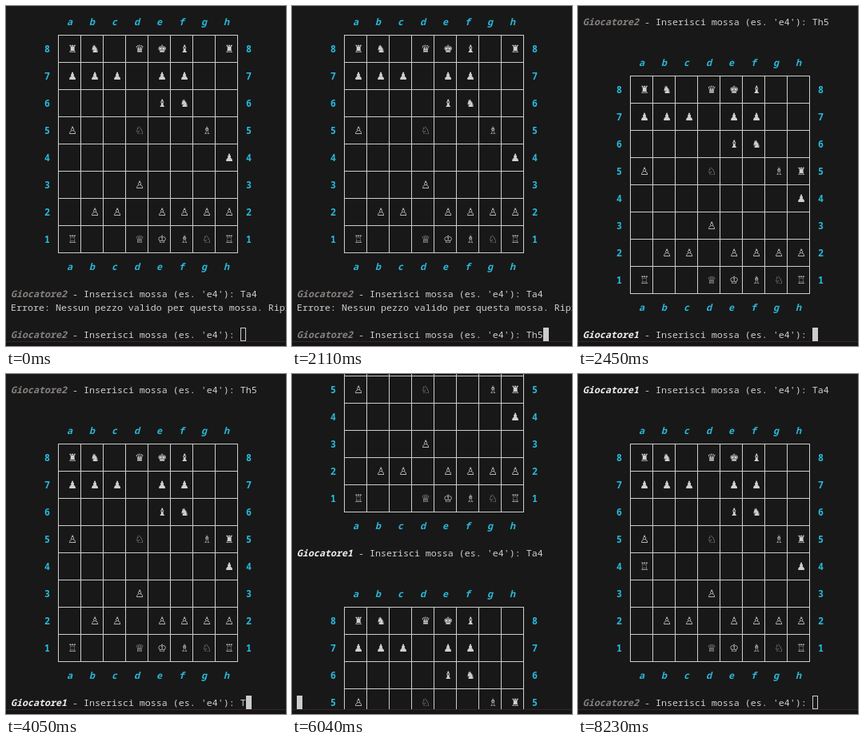
Write an HTML page that moves like this. It is 350 px wide and 425 px high and loops after 8300 ms.

```html
<!DOCTYPE html>
<html lang="it">
<head>
<meta charset="utf-8">
<title>Scacchi nel terminale</title>
<style>
  html, body { margin: 0; width: 100%; height: 100%; overflow: hidden; background: #181818; }
  svg { display: block; width: 350px; height: 425px; }
  text { font: 11.667px "Noto Sans Mono", monospace; fill: #d0d0d0; white-space: pre; }
  .label { font-weight: 700; fill: #29b8db; }
  .file, .player { font-style: italic; }
  .player { font-weight: 700; }
  .p1 { fill: #f0f0f0; }
  .p2 { fill: #87827f; }
  .piece { font: 13px "DejaVu Sans", sans-serif; text-anchor: middle; }
  .grid { stroke: #ccc; fill: none; }
</style>
</head>
<body>
<svg viewBox="0 0 350 425">
  <clipPath id="view"><rect width="350" height="419"/></clipPath>
  <g clip-path="url(#view)">
    <g id="screen"></g>
    <rect id="cursor" stroke="#ccc"/>
  </g>
  <rect y="419" width="350" height="1" fill="#2b2b2b"/>
  <rect y="420" width="350" height="5" fill="#181416"/>
</svg>
<script>
const COL = 7, ROW = 17, LEFT = 6, TOP = 11, LAST_ROW = 23, PROMPT_COL = 41, LOOP = 8300;
const GLYPHS = Object.fromEntries([..."KQRBNPkqrbnp"].map((key, i) => [key, String.fromCharCode(0x2654 + i)]));
const screen = document.getElementById("screen");
const cursor = document.getElementById("cursor");

const colX = col => LEFT + col * COL;
const rowY = row => TOP + row * ROW;

function add(parent, tag, attrs, content = "") {
  const node = document.createElementNS("http://www.w3.org/2000/svg", tag);
  for (const name in attrs) node.setAttribute(name, attrs[name]);
  node.textContent = content;
  return parent.appendChild(node);
}

function write(col, row, content, cls = "") {
  return add(screen, "text", { x: colX(col), y: rowY(row) + 13, class: cls }, content);
}

function drawBoard(row, position) {
  const left = colX(8) + 3.5, top = rowY(row + 1) + 8.5;
  let path = "";
  for (let i = 0; i <= 8; i++) {
    path += `M${left - 0.5} ${top + i * 34}h225M${left + i * 28} ${top - 0.5}v273`;
  }
  add(screen, "path", { d: path, class: "grid" });

  [..."abcdefgh"].forEach((file, i) => {
    for (const r of [row, row + 18]) write(10 + i * 4, r, file, "label file");
  });

  position.split("/").forEach((rank, i) => {
    const r = row + 2 + i * 2;
    for (const col of [6, 42]) write(col, r, 8 - i, "label");
    const squares = rank.replace(/\d/g, n => ".".repeat(n));
    [...squares].forEach((key, file) => {
      if (key === ".") return;
      add(screen, "text", { x: 83 + file * 28, y: rowY(r) + 13, class: "piece" }, GLYPHS[key] + "\uFE0E");
    });
  });
}

function drawPrompt(row, player, move = "") {
  const line = write(0, row, "");
  add(line, "tspan", { class: `player p${player}` }, `Giocatore${player}`);
  add(line, "tspan", {}, " - Inserisci mossa (es. 'e4'): ");
  return add(line, "tspan", {}, move);
}

const MIDDLE = "ppp1pp2/4bn2/";
const PAWNS = "3P4/1PP1PPPP/";
drawBoard(0, `rn1qkb1r/${MIDDLE}P2N2B1/7p/${PAWNS}R2QKBNR`);
drawPrompt(20, 2, "Ta4");
write(0, 21, "Errore: Nessun pezzo valido per questa mossa. Riprova.");
const firstMove = drawPrompt(23, 2);
drawBoard(26, `rn1qkb2/${MIDDLE}P2N2Br/7p/${PAWNS}R2QKBNR`);
const secondMove = drawPrompt(46, 1);
drawBoard(49, `rn1qkb2/${MIDDLE}P2N2Br/R6p/${PAWNS}3QKBNR`);
drawPrompt(69, 2);

// [start ms, scrolled rows, first move, second move, cursor column, focused]
const STEPS = [
  [0, 0, "", "", 41, false],
  [330, 0, "", "", 41, true],
  [1390, 0, "T", "", 42, true],
  [1980, 0, "Th", "", 43, true],
  [2110, 0, "Th5", "", 44, true],
  [2380, 11, "Th5", "", 0, true],
  [2450, 23, "Th5", "", 41, true],
  [4050, 23, "Th5", "T", 42, true],
  [4980, 23, "Th5", "Ta", 43, true],
  [5840, 23, "Th5", "Ta4", 44, true],
  [6040, 34, "Th5", "Ta4", 0, true],
  [6110, 46, "Th5", "Ta4", 41, true],
  [8230, 46, "Th5", "Ta4", 41, false]
];

for (const [name, value] of Object.entries({ y: rowY(LAST_ROW) + 0.5, width: COL - 1, height: ROW - 1 })) {
  cursor.setAttribute(name, value);
}

let shown;
function render() {
  const time = performance.now() % LOOP;
  const step = STEPS.findLast(([start]) => start <= time);
  if (step !== shown) {
    const [, scroll, first, second, col, focused] = shown = step;
    screen.setAttribute("transform", `translate(0 ${-scroll * ROW})`);
    firstMove.textContent = first;
    secondMove.textContent = second;
    cursor.setAttribute("x", colX(col) + 0.5);
    cursor.setAttribute("fill", focused ? "#ccc" : "none");
  }
  requestAnimationFrame(render);
}
render();
</script>
</body>
</html>
```
